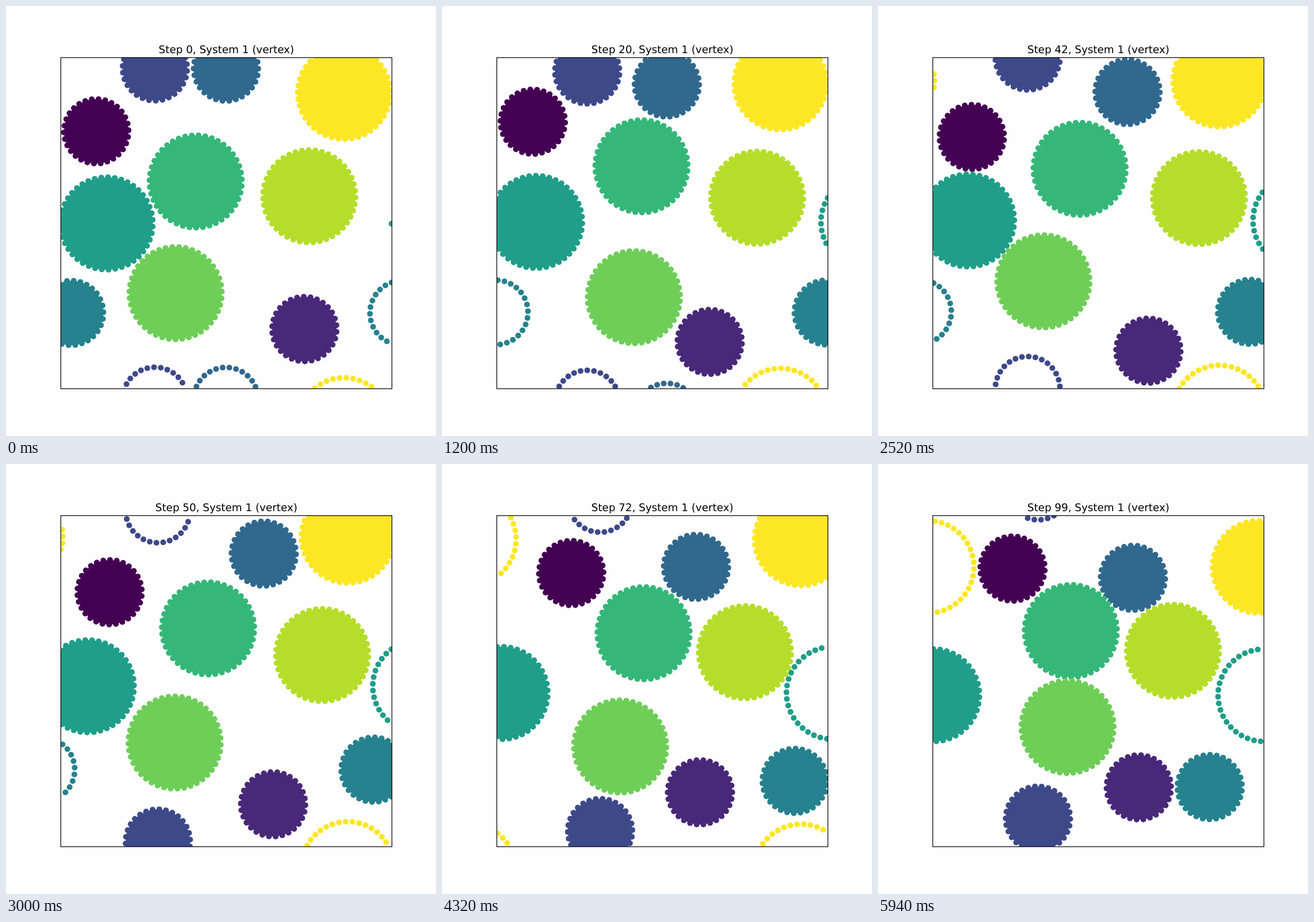
These frames come from a looping animation (748 px wide and 748 px high, 6 s). An HTML page with a canvas:

```html
<!DOCTYPE html>
<html lang="en">
<head>
<meta charset="utf-8">
<title>Bumpy disks in a periodic box</title>
<style>
  html, body { margin: 0; width: 100%; height: 100%; overflow: hidden; background: #fefefe; }
  canvas { display: block; width: 748px; height: 748px; }
</style>
</head>
<body>
<canvas id="stage" width="748" height="748"></canvas>
<script>
const ctx = document.getElementById('stage').getContext('2d');
const LEFT = 95.37, TOP = 89.76, SIZE = 575.96;
const STEPS = 100, STEP_MS = 60, BEAD = 5;
const SMALL = { beads: 30, radius: 56.2 };
const LARGE = { beads: 43, radius: 80.4 };
const disks = [];

// Each disk rolls at a steady rate and flies straight between bounces.
// shift, roll: rim offset of the top bead in px, and its change per step
// bounces: [step, x, y]
function disk(kind, color, shift, roll, ...bounces) {
  disks.push({ ...kind, color, shift, roll, bounces });
}

disk(SMALL, '#440154', 4, 0.17,
  [0, 157, 218], [15, 162, 200.5], [35, 145.7, 204], [43.5, 167, 233], [80, 241, 177.5], [99, 234, 182]);
disk(SMALL, '#482878', -1, -0.07,
  [0, 519, 562], [18, 463, 579], [30, 479, 611], [80, 443, 563.5], [99, 453.7, 562.5]);
disk(SMALL, '#3e4989', -1.5, 0.08,
  [0, 259, 108.6], [15, 252, 119], [28, 253.5, 105.8], [65, 271.5, 63.8], [80, 279, 61], [99, 278.3, 41]);
disk(SMALL, '#31688e', 6, 0.02,
  [0, 382.6, 109], [21, 391.5, 138], [28, 409, 138.7], [54, 455.5, 159], [65, 441.5, 174], [99, 443.5, 198]);
disk(SMALL, '#26828e', 4.5, -0.04,
  [0, 689.3, 534], [59, 630.3, 531.3], [65, 623, 548.5], [99, 577, 562]);
disk(LARGE, '#1f9e89', 2.5, -0.14,
  [0, 175, 378.3], [12, 169.5, 377], [36, 152, 372.8], [43, 157.5, 373.2], [59, 123, 404], [82, 88.7, 394], [99, 96, 402.3]);
disk(LARGE, '#35b779', 5, 0,
  [0, 330, 305.3], [22, 348.7, 276.3], [65, 353, 291.3], [85, 346.3, 300], [99, 335.4, 290.6]);
disk(LARGE, '#6ece58', 6, -0.1,
  [0, 295, 499.5], [18, 338, 509], [42, 287.7, 479], [65, 304, 495], [80, 316.8, 487.3], [99, 329.8, 457.5]);
disk(LARGE, '#b5de2b', -1, 0.035,
  [0, 527.5, 331], [36, 564.6, 335.5], [85, 513.3, 324.5], [99, 513, 325]);
disk(LARGE, '#fde725', 4, -0.15,
  [0, 588, 151.2], [30, 589, 126.5], [35, 593.5, 132], [53, 594.5, 125.5], [65, 611.5, 118.5], [85, 648.3, 154], [99, 662.5, 179]);

function position(bounces, step) {
  const i = Math.max(1, bounces.findIndex(b => b[0] >= step));
  const [t0, x0, y0] = bounces[i - 1], [t1, x1, y1] = bounces[i];
  const k = (step - t0) / (t1 - t0);
  return [x0 + (x1 - x0) * k, y0 + (y1 - y0) * k];
}

const wrap = (v, start) => start + (((v - start) % SIZE) + SIZE) % SIZE;

function drawDisk(d, step) {
  const [px, py] = position(d.bounces, step);
  const cx = wrap(px, LEFT), cy = wrap(py, TOP);
  const turn = (d.shift + d.roll * step) / d.radius - Math.PI / 2;
  const points = Array.from({ length: d.beads }, (_, i) => {
    const a = turn + i * 2 * Math.PI / d.beads;
    return [cx + d.radius * Math.cos(a), cy + d.radius * Math.sin(a)];
  });

  ctx.fillStyle = d.color;
  ctx.beginPath();
  for (const [x, y] of points) ctx.lineTo(x, y);
  ctx.fill();

  // beads reappear at the opposite side, the core does not
  for (const [x, y] of points) {
    ctx.beginPath();
    ctx.arc(wrap(x, LEFT), wrap(y, TOP), BEAD, 0, 2 * Math.PI);
    ctx.fill();
  }
}

function draw(step) {
  ctx.fillStyle = '#fefefe';
  ctx.fillRect(0, 0, 748, 748);

  ctx.save();
  ctx.beginPath();
  ctx.rect(LEFT, TOP, SIZE, SIZE);
  ctx.clip();
  for (const d of disks) drawDisk(d, step);
  ctx.restore();

  ctx.strokeStyle = '#000';
  ctx.lineWidth = 1.22;
  ctx.strokeRect(LEFT, TOP, SIZE, SIZE);

  ctx.fillStyle = '#000';
  ctx.font = '18.33px "DejaVu Sans", sans-serif';
  ctx.textRendering = 'geometricPrecision';
  ctx.textAlign = 'center';
  ctx.fillText(`Step ${step}, System 1 (vertex)`, LEFT + SIZE / 2, 82);
}

const start = performance.now();
let shown = -1;
function tick() {
  const step = Math.floor((performance.now() - start) / STEP_MS) % STEPS;
  if (step !== shown) draw(shown = step);
  requestAnimationFrame(tick);
}
tick();
</script>
</body>
</html>
```
